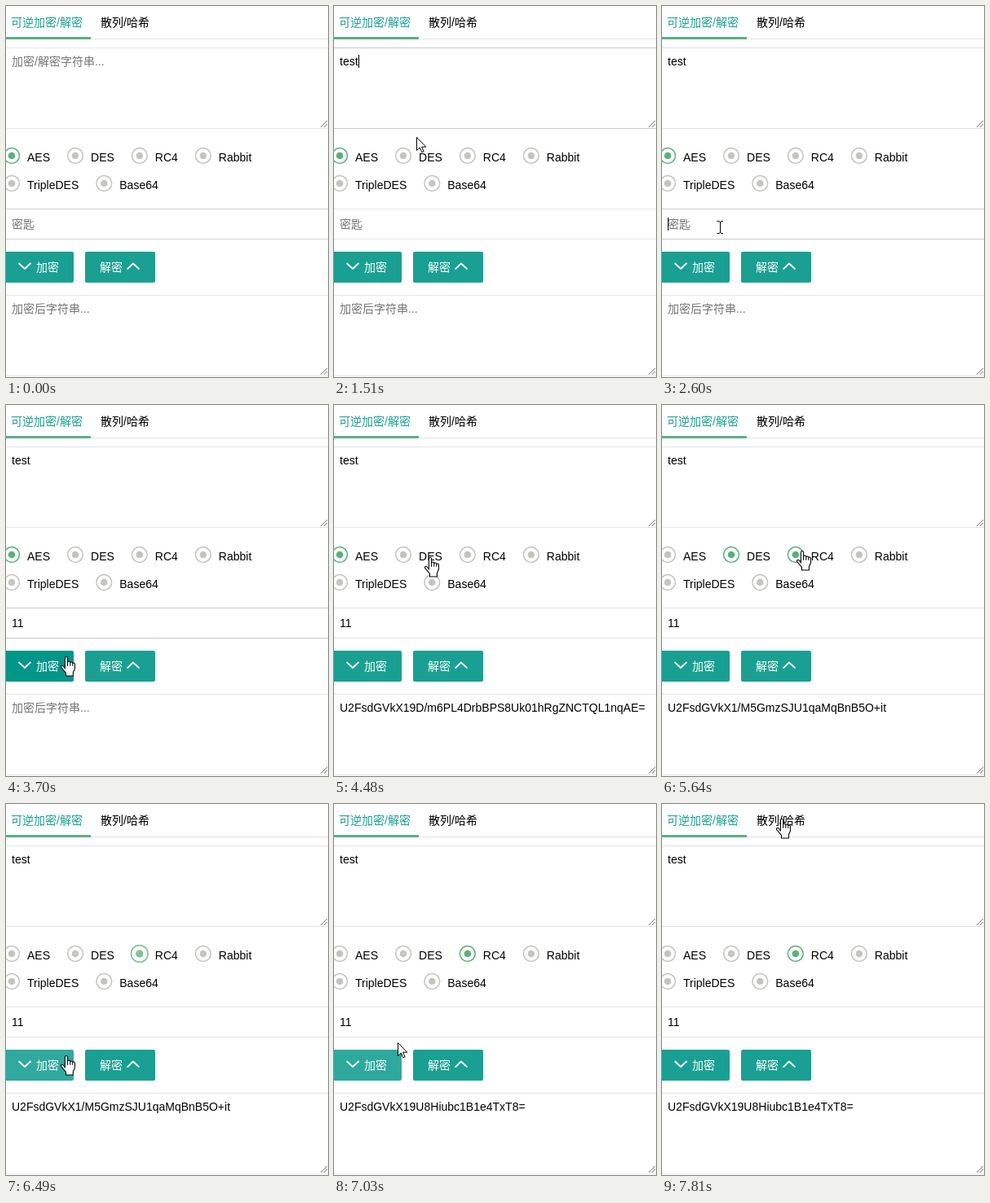
Write an HTML page that moves like this. It is 395 by 456 pixels and loops after 8000 ms.

```html
<!DOCTYPE html>
<html lang="zh">
<head>
<meta charset="utf-8">
<style>
html, body { margin: 0; height: 100%; overflow: hidden; background: #fff; }
svg { display: block; width: 395px; height: 456px; font: 14px "Liberation Sans", Arial, "Noto Sans CJK SC", "Noto Sans CJK", sans-serif; }
.hint { fill: #757575; }
.chevron { fill: none; stroke: #fff; stroke-width: 1.8; }
.grip { stroke: #777; fill: none; }
#pointer path { fill: #fff; stroke: #000; stroke-linejoin: round; }
#pointer path.line { fill: none; }
</style>
</head>
<body>
<svg viewBox="0 0 395 456">
  <text x="6" y="25" fill="#1a9f92">可逆加密/解密</text>
  <text x="116" y="25">散列/哈希</text>
  <path d="M0 40.5H395" stroke="#e2e2e2"/>
  <rect y="38" width="104" height="3" fill="#5fad85"/>
  <g id="fields" fill="none"></g>
  <path class="grip" d="M386 149l8-8M390 149l4-4M386 453l8-8M390 453l4-4"/>
  <g id="radios"></g>
  <g fill="#009688">
    <rect id="encrypt" x="-3" y="302" width="86" height="38" rx="2"/>
    <rect x="97" y="302" width="86" height="38" rx="2" opacity=".9"/>
  </g>
  <path class="chevron" d="M15.5 316l7.5 7 7.5-7M148.5 323.5l7.5-7 7.5 7"/>
  <text x="37" y="326" fill="#fff">加密</text>
  <text x="115" y="326" fill="#fff">解密</text>
  <text id="plain" x="7" y="73"></text>
  <text id="key" x="7" y="273"></text>
  <text id="cipher" x="7" y="377"></text>
  <rect id="caret" width="1" height="16"/>
  <g id="pointer">
    <path id="arrow" d="M.5.5V16.5L4.3 13l2.5 5.8 2.3-1-2.5-5.6h5.2z"/>
    <path id="beam" class="line" d="M-3.5-7.5H-1L.5-6.5 2-7.5H4M-3.5 7.5H-1L.5 6.5 2 7.5H4M.5-6.5V6.5"/>
    <g id="hand" transform="scale(1.07)">
      <path d="M-1.5 14V2a1.5 1.5 0 0 1 3 0V7a1.5 1.5 0 0 1 3 .3a1.5 1.5 0 0 1 2.8.7a1.4 1.4 0 0 1 2.5.8V14l-2 4.500v4H-.5V19L-6 12.500a1.4 1.4 0 0 1 2.300-1.500z"/>
      <path class="line" d="M1.5 7v4M4.5 7.3V11M7.3 8V11"/>
    </g>
  </g>
</svg>
<script>
const $ = id => document.getElementById(id);
const LOOP = 8000;
const AREA = 0, KEY = 1, NONE = -1;

const spots = {
  start: [255, 275], area: [156, 106], gap: [101, 161], key: [71, 272],
  button: [74, 309], des: [118, 187], rc4: [172, 179], tab: [147, 18]
};
// pointer moves: from, until, where to
const moves = [
  [70, 590, "area"], [1220, 1510, "gap"], [1510, 2130, "button"], [2130, 2370, "key"],
  [2680, 3300, "button"], [4120, 4480, "des"], [4650, 4930, "button"],
  [5200, 5600, "rc4"], [6080, 6250, "button"], [6900, 7810, "tab"]
];
const focuses = [[0, NONE], [430, AREA], [2370, KEY], [3700, NONE]];
const picks = [[-LOOP, "AES"], [4630, "DES"], [6090, "RC4"]];
const results = [
  [0, ""], [3850, "U2FsdGVkX19D/m6PL4DrbBPS8Uk01hRgZNCTQL1nqAE="],
  [5180, "U2FsdGVkX1/M5GmzSJU1qaMqBnB5O+it"], [6880, "U2FsdGVkX19U8Hiubc1B1e4TxT8="]
];
const inputs = [
  { id: "plain", text: "test", start: 980, step: 105, hint: "加密/解密字符串...", caretY: 60 },
  { id: "key", text: "11", start: 2950, step: 520, hint: "密匙", caretY: 260 }
];
const fields = [[51, 99], [249, 37], [355, 99]];
const rows = [["AES", "DES", "RC4", "Rabbit"], ["TripleDES", "Base64"]];

const latest = (list, t) => list.filter(e => e[0] <= t).pop() || list[0];
const clamp = (v, lo, hi) => Math.min(Math.max(v, lo), hi);
const mix = (a, b, p) => a + (b - a) * p;
const smooth = p => p * p * (3 - 2 * p);

$("fields").innerHTML = fields.map(([y, h]) =>
  `<rect x="-3.5" y="${y + .5}" width="402" height="${h}" rx="2"/>`).join("");
const boxes = [...$("fields").children];

$("radios").innerHTML = rows.flat().map(name => `<g>
  <circle r="9.4" fill="none" stroke-width="1.5"/><circle r="4.3" stroke="none"/></g>
  <text>${name}</text>`).join("");
const icons = [...$("radios").querySelectorAll("g")];
const labels = [...$("radios").querySelectorAll("text")];
const radios = [];
rows.forEach((row, r) => {
  let x = 7;
  for (const name of row) {
    const label = labels[radios.length], y = 184 + 34 * r;
    const width = label.getComputedTextLength();
    label.setAttribute("x", x + 19);
    label.setAttribute("y", y + 7);
    radios.push({ name, x, y, right: x + 25 + width });
    x += 50 + width;
  }
});

function pointerAt(t) {
  let at = spots.start;
  for (const [from, until, spot] of moves) {
    const p = smooth(clamp((t - from) / (until - from), 0, 1));
    at = at.map((v, i) => mix(v, spots[spot][i], p));
  }
  return at;
}

const onField = ([, y]) => fields.findIndex(([top, h]) => y >= top && y <= top + h);
const onButton = ([x, y]) => y >= 302 && y < 340 && x >= 0 && x < 83;
const onRadio = ([x, y]) => radios.findIndex(r => Math.abs(y - r.y) < 12 && x > r.x - 10 && x < r.right);
const onTab = ([x, y]) => y < 40 && x > 106 && x < 186;

// trailing mean: a linear 300 ms transition
function eased(f, t) {
  let sum = 0;
  for (let i = 0; i < 20; i++) sum += f(t - i * 15);
  return sum / 20;
}

function drawField(t, i) {
  const shade = s => latest(focuses, s)[1] === i ? 201 : onField(pointerAt(s)) === i ? 210 : 230;
  const v = Math.round(eased(shade, t));
  boxes[i].setAttribute("stroke", `rgb(${v},${v},${v})`);
}

function drawRadio(t, i) {
  const { name, x, y } = radios[i], [since, picked] = latest(picks, t);
  const chosen = name === picked;
  const color = chosen || onRadio(pointerAt(t - 100)) === i ? "#5bb07c" : "#c4c4c0";
  const p = chosen ? Math.min((t - since) / 500, 1) : 1;
  const scale = p < .8 ? mix(.5, 1.1, p / .8) : mix(1.1, 1, (p - .8) / .2);
  const g = icons[i];
  g.setAttribute("transform", `translate(${x} ${y}) scale(${scale})`);
  g.setAttribute("opacity", p < .8 ? mix(.5, .75, p / .8) : mix(.75, 1, (p - .8) / .2));
  g.setAttribute("stroke", color);
  g.setAttribute("fill", color);
}

function setText(id, value, hint) {
  $(id).textContent = value || hint;
  $(id).setAttribute("class", value ? "" : "hint");
}

const typedCount = ({ text, start, step }, t) =>
  clamp(Math.floor((t - start) / step) + 1, 0, text.length);

function drawCaret(t) {
  const [since, field] = latest(focuses, t), input = inputs[field];
  $("caret").style.display = "none";
  if (!input) return;
  const n = typedCount(input, t);
  const lastKey = n ? input.start + input.step * (n - 1) : since;
  if ((t - lastKey) % 1000 >= 500) return;
  $("caret").style.display = "";
  $("caret").setAttribute("x", Math.round(7 + (n && $(input.id).getComputedTextLength())));
  $("caret").setAttribute("y", input.caretY);
}

function drawPointer(t) {
  const at = pointerAt(t);
  const kind = onField(at) >= 0 ? "beam"
    : onButton(at) || onRadio(at) >= 0 || onTab(at) ? "hand" : "arrow";
  for (const id of ["arrow", "beam", "hand"]) $(id).style.display = id === kind ? "" : "none";
  $("pointer").setAttribute("transform", `translate(${at.map(Math.round)})`);
  const hidden = t < 70 || t >= 980 && t < 1220;
  $("pointer").style.display = hidden ? "none" : "";
}

function draw(t) {
  fields.forEach((_, i) => drawField(t, i));
  radios.forEach((_, i) => drawRadio(t, i));
  for (const input of inputs) setText(input.id, input.text.slice(0, typedCount(input, t)), input.hint);
  setText("cipher", latest(results, t)[1], "加密后字符串...");
  const pressed = results.some(([at]) => t >= at - 150 && t < at);
  $("encrypt").setAttribute("opacity", pressed ? 1 : .9 - .1 * eased(s => onButton(pointerAt(s)), t));
  drawCaret(t);
  drawPointer(t);
}

const start = performance.now();
function tick() {
  draw((performance.now() - start) % LOOP);
  requestAnimationFrame(tick);
}
tick();
</script>
</body>
</html>
```
